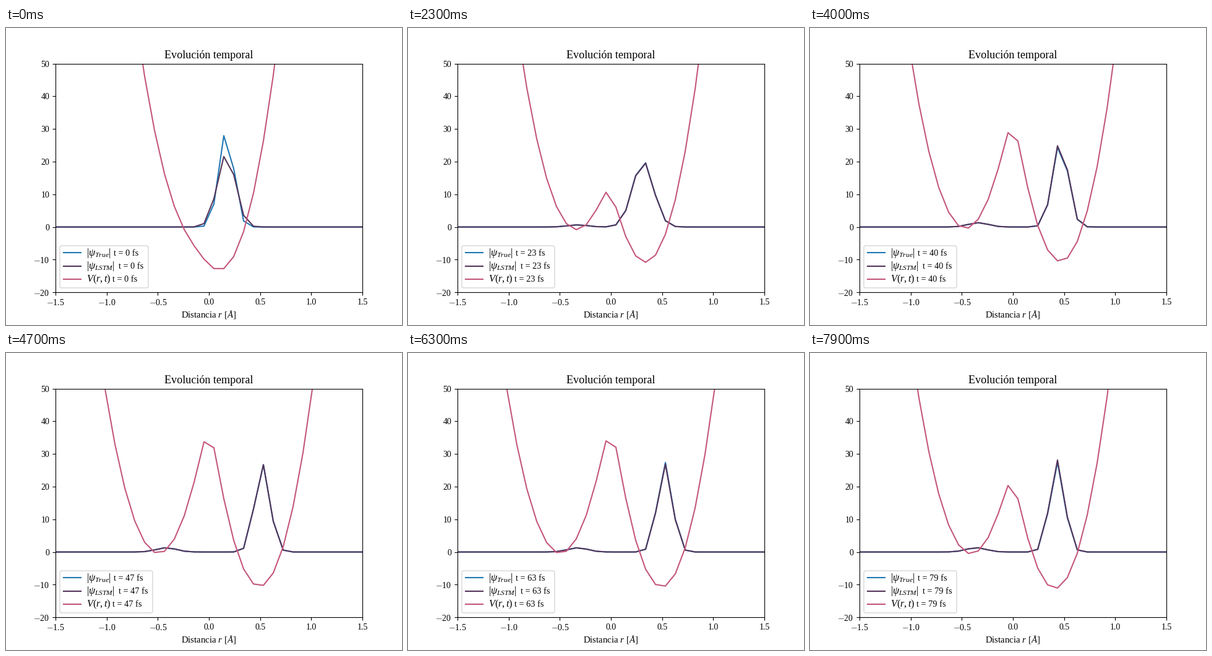
Write a matplotlib script that moves like this. It is 640x480 px and loops after 8000 ms.

```python
import numpy as np
import matplotlib.pyplot as plt
from matplotlib.animation import FuncAnimation
from matplotlib.patches import FancyBboxPatch
from matplotlib.ticker import FuncFormatter
from matplotlib.transforms import Affine2D

W, H, DPI = 640, 480, 100
FRAMES, INTERVAL = 80, 100
BLUE, PLUM, PINK = "#1f77b4", "#54355a", "#c4567c"

plt.rcParams.update({
    "font.family": "Liberation Serif",
    "font.size": 10,
    "mathtext.fontset": "custom",
    "mathtext.rm": "Liberation Serif",
    "mathtext.it": "Liberation Serif:italic",
})

# Lengths are in grid steps, n = 0 is the middle of the axis
N = 32
n = np.arange(N) - (N - 1) / 2
x = np.linspace(-1.5, 1.5, N)

# Sway of the packet about the right-hand well
SWAY_T = [0, 14, 32, 40, 54, 63, 79]
SWAY = [.48, -.86, .30, -.03, .61, .32, .21]


def well(t):
    """Distance of each well from the middle; it swings out and back."""
    return 2.52 + 2.72 * np.cos(0.037 * (t - 55.3))


def potential(t):
    """Lower adiabatic curve of two coupled parabolas."""
    depth = 10.1 + 0.5 * ((t - 25) / 50) ** 2
    a = 1.73 * (n + well(t)) ** 2 - 0.1
    b = 2.12 * (n - well(t)) ** 2 - depth
    return (a + b) / 2 - np.sqrt((a - b) ** 2 / 4 + 68)


def bell(center, sigma):
    return np.exp(-((n - center) / sigma) ** 2 / 2)


def packet(t, mass=1.0, stretch=1.0):
    """Main bell in the right well and a small rest in the left one."""
    center = well(t) + np.interp(t, SWAY_T, SWAY)
    spread = (t / 14 * np.exp(1 - t / 14)) ** 3
    sigma = (0.74 + 0.47 * spread) * stretch
    split = np.clip((t - 16) / 14, 0, 1)
    main = (55 - 4 * split) / (sigma * np.sqrt(2 * np.pi)) * bell(center, sigma)
    rest = 1.3 * split * bell(-4.3 - np.cos(np.pi * (t - 32) / 10), 1)
    return mass * (main + rest)


def predicted(t):
    """Too wide at the start, then within a few percent."""
    start = np.exp(-t / 3)
    wobble = 0.025 * (1 - start) * np.sin(2 * np.pi * (t - 25) / 44)
    return packet(t, 1 - 0.07 * start + wobble, 1 + 0.23 * start)


def signed(fmt):
    def label(v, _):
        text = format(abs(v), fmt)
        return "$-$" + text if v < -1e-9 else text
    return FuncFormatter(label)


fig, ax = plt.subplots(figsize=(W / DPI, H / DPI), dpi=DPI)
px = Affine2D().scale(1 / W, -1 / H).translate(0, 1) + fig.transFigure

ax.set_xlim(-1.5, 1.5)
ax.set_ylim(-20, 50)
ax.set_xticks(np.arange(-1.5, 1.6, 0.5))
ax.xaxis.set_major_formatter(signed(".1f"))
ax.yaxis.set_major_formatter(signed(".0f"))
for lab in ax.get_xticklabels() + ax.get_yticklabels():
    lab.set_math_fontfamily("cm")
ax.set_title("Evolución temporal", fontsize=13.1)
ax.text(327.5, 467, r"Distancia $r\ [Å]$", fontsize=10.7, ha="center",
        va="baseline", transform=px)

# Legend in stage pixels
box = FancyBboxPatch((87, 352), 143, 68, transform=px, fc="white", ec="0.8",
                     lw=1, alpha=0.8, zorder=5,
                     boxstyle="round,pad=0,rounding_size=2.8")
ax.add_patch(box)
curves, clocks = [], []
for y, color, name, clock_x, curve in [
        (363, BLUE, "$|ψ_{True}|$", 173.5, packet),
        (384.5, PLUM, "$|ψ_{LSTM}|$", 181.5, predicted),
        (405.5, PINK, "$V(r,t)$", 172, potential)]:
    line, = ax.plot(x, 0 * x, color=color, lw=1.5)
    curves.append((line, curve))
    ax.plot([93, 120.8], [y, y], color=color, lw=1.5, transform=px,
            zorder=6, scalex=False, scaley=False)
    label = dict(va="baseline", transform=px, zorder=6)
    ax.text(130, y + 4.8, name, fontsize=11.8, **label)
    clocks.append(ax.text(clock_x, y + 4.8, "", fontsize=10.3, **label))


def update(t):
    for line, curve in curves:
        line.set_ydata(curve(t))
    box.set_width(143 if t < 10 else 150)
    for clock in clocks:
        clock.set_text(f"t = {t} fs")
    return *(line for line, _ in curves), box, *clocks


anim = FuncAnimation(fig, update, frames=FRAMES, interval=INTERVAL,
                     repeat=True, repeat_delay=0)
plt.show()
```
